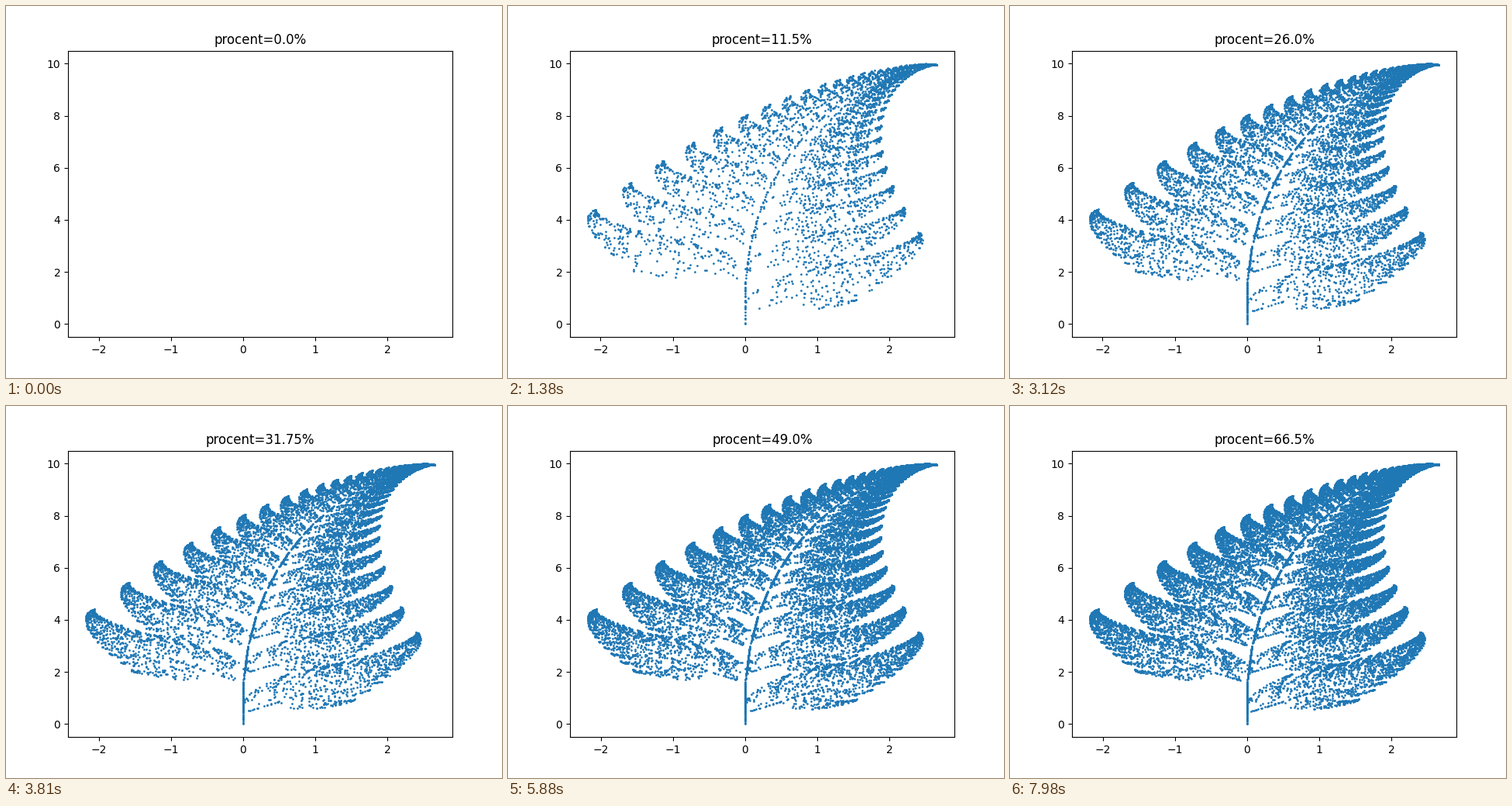
These frames come from a looping animation (640x480 px, 8 s). A matplotlib script:

```python
import random

import matplotlib.pyplot as plt
import numpy as np
from matplotlib.animation import FuncAnimation

FRAMES = 267
LOOP_MS = 8000
STEP = 100          # points added per frame
SETTLE = 27         # the axes follow the data until here
WIDEN = 120         # the leftmost point is reached here

# x' = a x + b y,  y' = c x + d y + f
STEM = (0, 0, 0, 0.16, 0)
MAIN = (0.85, 0.04, -0.04, 0.85, 1.6)
LEFT = (0.2, -0.26, 0.23, 0.22, 1.6)
RIGHT = (-0.15, 0.28, 0.26, 0.24, 0.44)


def fern(n):
    rng = random.Random(11)
    maps = rng.choices((STEM, MAIN, LEFT, RIGHT), (1, 85, 7, 7), k=n - 1)
    pts = [(0.0, 0.0)]
    for a, b, c, d, f in maps:
        x, y = pts[-1]
        pts.append((a * x + b * y, c * x + d * y + f))
    return np.array(pts).T


def padded(lo, hi):
    pad = 0.05 * (hi - lo)
    return lo - pad, hi + pad


xs, ys = fern(STEP * FRAMES)

plt.rcParams["font.family"] = "DejaVu Sans"
fig, ax = plt.subplots(figsize=(6.4, 4.8), dpi=100)
dots, = ax.plot([], [], "o", color="C0", markersize=1)
title = ax.set_title("")


def update(i):
    x, y = xs[:STEP * i], ys[:STEP * i]
    dots.set_data(x, y)
    if 0 < i < SETTLE:
        xr, yr = (x.min(), x.max()), (y.min(), y.max())
    else:
        left = -2.1803 if SETTLE <= i < WIDEN else -2.182
        xr, yr = (left, 2.6558), (0, 9.998)
    ax.set_xlim(padded(*xr))
    ax.set_ylim(padded(*yr))
    title.set_text(f"procent={i * 0.25}%")
    return dots, title


anim = FuncAnimation(fig, update, frames=FRAMES, interval=LOOP_MS / FRAMES,
                     init_func=lambda: update(0), repeat=True,
                     repeat_delay=0, blit=False)
plt.show()
```
